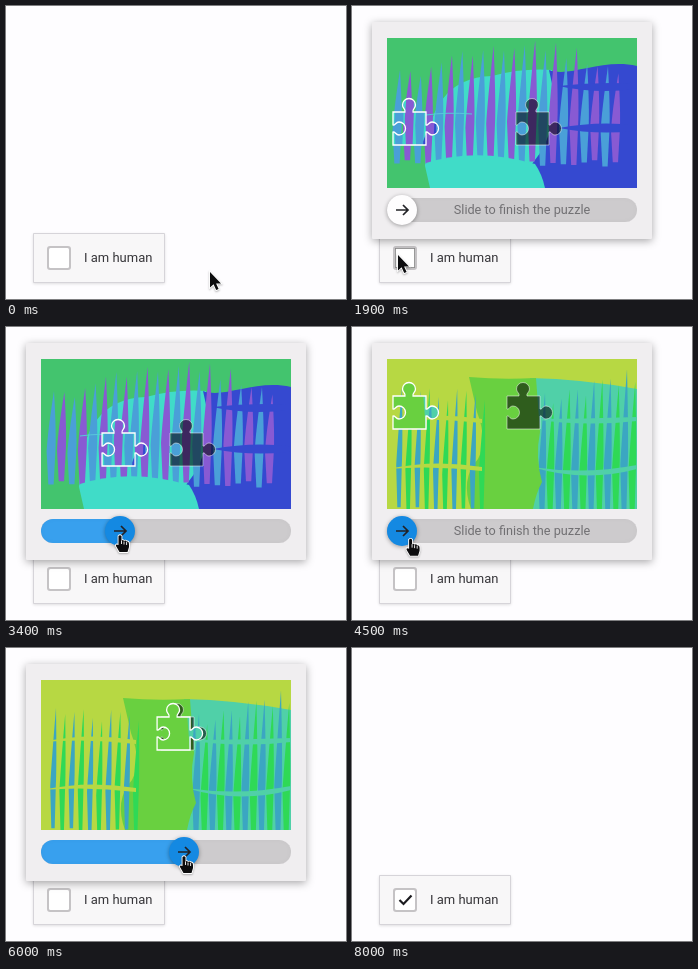
An HTML page with a canvas that plays this animation: 340x293 px, repeating every 8.4 s.

```html
<!DOCTYPE html>
<html lang="en">
<head>
<meta charset="utf-8">
<title>Puzzle check</title>
<style>
html, body { margin: 0; width: 100%; height: 100%; overflow: hidden; background: #fefdff; }
canvas { display: block; }
</style>
</head>
<body>
<canvas id="stage" width="340" height="293"></canvas>
<script>
const W = 340, H = 293, LOOP = 8400, STEP = 100;
const PIC = { x: 35, y: 32, w: 250, h: 150 };
const BAR = { x: 35, y: 192, w: 250, h: 24, mid: 204 };
const KNOB = 50, RATIO = 0.86;

const stage = document.getElementById('stage').getContext('2d');
const layer = () => Object.assign(document.createElement('canvas'), { width: W, height: H }).getContext('2d');
const panel = layer(), content = layer();

// Timing helpers
const ramp = (t, from, to) => Math.min(1, Math.max(0, (t - from) / (to - from)));
const ease = (t, from, to) => {
  const p = ramp(t, from, to);
  return p * p * (3 - 2 * p);
};
const swing = (t, from, to, size) => size * Math.sin(Math.PI * ramp(t, from, to));
const within = (t, from, to) => t >= from && t < to;

function seeded(seed) {
  return () => (seed = seed * 16807 % 2147483647) / 2147483647;
}

// Drawing helpers
function shape(c, d, color) {
  c.fillStyle = color;
  c.fill(new Path2D(d));
}
function line(c, d, color, width) {
  c.strokeStyle = color;
  c.lineWidth = width;
  c.stroke(new Path2D(d));
}
function box(c, x, y, w, h, r, color) {
  c.fillStyle = color;
  c.beginPath();
  c.roundRect(x, y, w, h, r);
  c.fill();
}
function shadow(c, color, blur, y) {
  c.shadowColor = color;
  c.shadowBlur = blur;
  c.shadowOffsetY = y;
}
function check(c, x, y) {
  line(c, `M${x - 5.5} ${y} l4 4 l8 -8.5`, '#1b1b1f', 2.2);
}

// A tall leaf with a sharp tip
function blade(c, x, top, bottom, w, color) {
  const mid = top + (bottom - top) * 0.65, h = w / 2;
  shape(c, `M${x + 3} ${top} Q${x + h + 1} ${mid - 20} ${x + h} ${mid}
    L${x + h * 0.6} ${bottom} H${x - h * 0.6} L${x - h} ${mid}
    Q${x - h + 1} ${mid - 20} ${x + 3} ${top}Z`, color);
}
function blades(c, from, to, gap, w, topAt, bottom, colors, random) {
  for (let x = from, i = 0; x <= to; x += gap, i++) {
    blade(c, x, topAt(x) + random() * 16 - 8, bottom + random() * 8 - 4, w, colors[i % 2]);
  }
}
// A flat horizontal sliver, thickest in the middle
function sliver(c, from, to, y, bend, thick, color) {
  const mid = (from + to) / 2;
  shape(c, `M${from} ${y} Q${mid} ${y + bend - thick} ${to} ${y - 2}
    V${y + 2} Q${mid} ${y + bend + thick} ${from} ${y}Z`, color);
}

function picture(bg, paint) {
  const c = layer();
  c.beginPath();
  c.rect(PIC.x, PIC.y, PIC.w, PIC.h);
  c.clip();
  c.fillStyle = bg;
  c.fillRect(PIC.x, PIC.y, PIC.w, PIC.h);
  paint(c);
  return c.canvas;
}

const blueScene = picture('#43c46e', c => {
  const deep = '#3549d0', teal = '#40dcc8';
  shape(c, 'M73 160 Q74 72 140 70 Q170 62 200 64 L206 182 H78Z', teal);
  shape(c, 'M197 64 C218 72 250 52 285 60 V182 H180 V158 Q212 120 197 64Z', deep);
  const tops = x => 74 - 32 * Math.sin(Math.PI * ramp(x, 40, 300));
  blades(c, 45, 266, 10.4, 8.8, tops, 158, ['#4a9fd8', '#885ad3'], seeded(11));
  sliver(c, 206, 290, 80, 2, 7, deep);
  sliver(c, 207, 290, 122, 0, 8, deep);
  line(c, 'M74 109 Q95 106 120 108', '#58c8dc', 1);
  shape(c, 'M74 157 Q125 141 183 158 Q190 168 193 182 H81Z', teal);
});

const limeScene = picture('#b7d843', c => {
  const colors = ['#3ba6c2', '#2fd956'], teal = '#50d0a8', lime = '#b7d843';
  shape(c, 'M178 51 Q230 52 285 62 V182 H178Z', teal);
  blades(c, 190, 284, 8.2, 7.4, x => 74 - 26 * ramp(x, 190, 275), 190, colors, seeded(5));
  sliver(c, 180, 285, 92, 4, 4, teal);
  sliver(c, 180, 285, 140, 12, 4, teal);
  shape(c, 'M117 50 Q150 53 184 51 L188 105 Q183 130 190 155 Q184 166 181 182 H119 Q108 152 126 132 Q136 114 125 85Z', '#69d040');
  blades(c, 47, 130, 9.2, 5.6, () => 68, 184, colors, seeded(23));
  sliver(c, 35, 130, 94, -7, 3, lime);
  sliver(c, 35, 130, 142, -7, 3, lime);
});

// Jigsaw outline, origin at its top left corner
const piece = new Path2D(`M1 14 H13 C14 11 10.5 10.5 10.5 7 A6.5 6.5 0 0 1 23.5 7
  C23.5 10.5 20 11 21 14 H34 V27 C36 28 36.5 24 40 24 A6.5 6.5 0 0 1 40 37
  C36.5 37 36 33 34 34 V47 H1 V34 C3 33 3.5 37 7 37 A6.5 6.5 0 0 0 7 24
  C3.5 24 3 28 1 27Z`);

function puzzle(c, scene, holeX, y, x) {
  c.drawImage(scene, 0, 0);
  c.save();
  c.translate(holeX, y);
  c.fillStyle = 'rgba(0,0,0,.55)';
  c.fill(piece);
  c.strokeStyle = 'rgba(255,255,255,.5)';
  c.lineWidth = 1;
  c.stroke(piece);
  c.restore();

  c.save();
  c.translate(x, y);
  c.save();
  c.clip(piece);
  c.drawImage(scene, -holeX, -y);
  c.restore();
  c.strokeStyle = '#fff';
  c.lineWidth = 1.3;
  c.stroke(piece);
  c.restore();
}

const knobColors = {
  idle: ['#fefdfe', '#38a0ee'],
  active: ['#1489e2', '#38a0ee'],
  fail: ['#ea4652', '#f4828a'],
  done: ['#39d56c', '#7be684']
};

function slider(c, drag, state) {
  const [knob, fill] = knobColors[state];
  const x = KNOB + drag, y = BAR.mid;

  c.save();
  c.beginPath();
  c.roundRect(BAR.x, BAR.y, BAR.w, BAR.h, 12);
  c.clip();
  box(c, BAR.x, BAR.y, BAR.w, BAR.h, 0, '#cdcbcd');
  if (drag > 0) box(c, BAR.x, BAR.y, drag + 15, BAR.h, 0, fill);
  shadow(c, 'rgba(0,0,0,.3)', 5, 0);
  c.strokeStyle = 'rgba(0,0,0,.3)';
  c.lineWidth = 1;
  c.beginPath();
  c.roundRect(BAR.x - 1, BAR.y - 1, BAR.w + 2, BAR.h + 2, 13);
  c.stroke();
  c.restore();

  c.save();
  c.globalAlpha = 1 - ramp(drag, 0, 16);
  c.fillStyle = '#717073';
  c.font = '12.7px Roboto, sans-serif';
  c.textAlign = 'center';
  c.fillText('Slide to finish the puzzle', 170, y + 4);
  c.restore();

  c.save();
  shadow(c, 'rgba(0,0,0,.35)', 4, 1);
  box(c, x - 15, y - 15, 30, 30, 15, knob);
  c.restore();
  if (state === 'done') check(c, x, y);
  else line(c, `M${x - 6} ${y} h12 m-5 -5 l5 5 l-5 5`, '#222226', 1.7);
}

// Two tries: the first falls short, the second overshoots and settles
function dragAt(t) {
  const first = 64 * (ease(t, 2800, 3400) - ramp(t, 4100, 4200));
  return first + 132 * ease(t, 4800, 5700) - 4 * ease(t, 5800, 6000);
}

function knobState(t) {
  if (t >= 6400) return 'done';
  if (within(t, 3600, 4200)) return 'fail';
  return within(t, 2600, 3600) || t >= 4400 ? 'active' : 'idle';
}

function popup(t) {
  const second = t >= 4200, drag = dragAt(t);
  const x = 40 + drag * RATIO;

  content.clearRect(0, 0, W, H);
  if (second) puzzle(content, limeScene, 154, 55, x);
  else puzzle(content, blueScene, 163, 92, x);
  slider(content, drag, knobState(t));

  panel.clearRect(0, 0, W, H);
  panel.save();
  shadow(panel, 'rgba(0,0,0,.35)', 9, 2);
  box(panel, 20, 16, 280, 217, 1, '#f0eef0');
  panel.restore();
  panel.globalAlpha = second ? ramp(t, 4100, 4500) : ramp(t, 1600, 1900) - ramp(t, 3800, 4200);
  panel.drawImage(content.canvas, 0, 0);
  panel.globalAlpha = 1;

  stage.globalAlpha = 1 - (1 - ramp(t, 700, 1600)) ** 2;
  stage.drawImage(panel.canvas, 0, 0);
  stage.globalAlpha = 1;
}

function button(c, t) {
  c.save();
  shadow(c, 'rgba(0,0,0,.12)', 3, 1);
  box(c, 27, 227, 132, 50, 1, '#d6d4d9');
  c.restore();
  box(c, 28, 228, 130, 48, 0, '#f8f7f8');
  box(c, 41, 240, 24, 24, 3, '#c5c3c5');
  box(c, 43, 242, 20, 20, 1.5, '#fff');
  if (within(t, 800, 2600)) {
    c.setLineDash([1, 1]);
    c.strokeStyle = '#333';
    c.lineWidth = 1;
    c.strokeRect(43.5, 242.5, 19, 19);
    c.setLineDash([]);
  }
  if (t >= 6900) check(c, 53, 252);
  c.fillStyle = '#363539';
  c.font = '13px Roboto, sans-serif';
  c.fillText('I am human', 78, 256);
}

// Where the pointer stops; bow bends the way there sideways
const rest = [204, 266], tick = [46, 249], grip = [50, 208], miss = [118, 237], end = [163, 235];
const legs = [
  { from: 200, to: 600, a: rest, b: tick },
  { from: 2100, to: 2600, a: tick, b: grip, bow: 66 },
  { from: 3500, to: 3700, a: [114, 208], b: miss },
  { from: 3800, to: 4700, a: miss, b: grip },
  { from: 6100, to: 6600, a: [178, 208], b: end },
  { from: 7800, to: 7900, a: end, b: [88, 66] }
];
const holding = t => within(t, 2800, 3500) || within(t, 4800, 6100);

function pointer(t) {
  const { from, to, a, b, bow = 0 } = legs.findLast(l => l.from <= t) || legs[0];
  const p = ease(t, from, to);
  let [x, y] = a.map((v, i) => v + (b[i] - v) * p);
  x += swing(t, from, to, bow);
  if (holding(t)) {
    x += dragAt(t);
    y += swing(t, 2800, 3400, 30) + swing(t, 4800, 5300, 28) - swing(t, 5300, 5500, 8);
  }
  return [x, y];
}

const arrow = 'M0 0 V15.5 L3.6 12.3 L6.2 18 L8.6 17 L6.1 11.4 H11Z';
const hand = `M-1.5 1 Q0 -.6 1.5 1 V5.5 Q3 4.5 4 6 Q5.6 5 6.6 6.6 Q9 6 9 9
  V12 L7.5 17 H-.5 L-4 11 Q-4.6 8.6 -1.5 10Z`;

function cursor(c, t) {
  if (t >= 8000) return;
  const grab = within(t, 2500, 3600) || within(t, 4300, 6500);
  const form = grab ? hand : arrow;
  c.save();
  c.translate(...pointer(t));
  shadow(c, 'rgba(0,0,0,.3)', 2, 1);
  line(c, form, '#fff', 1.8);
  c.shadowColor = 'transparent';
  shape(c, form, '#0c0c0e');
  if (grab) line(c, 'M1.5 5.5 V9 M4 6.5 V9.5 M6.6 7 V10', '#fff', 0.9);
  c.restore();
}

function draw(t) {
  stage.fillStyle = '#fefdff';
  stage.fillRect(0, 0, W, H);
  button(stage, t);
  if (within(t, 800, 6900)) popup(t);
  cursor(stage, t);
}

const start = performance.now();
function frame() {
  const t = (performance.now() - start) % LOOP;
  draw(Math.floor(t / STEP) * STEP);
  requestAnimationFrame(frame);
}
frame();
</script>
</body>
</html>
```
